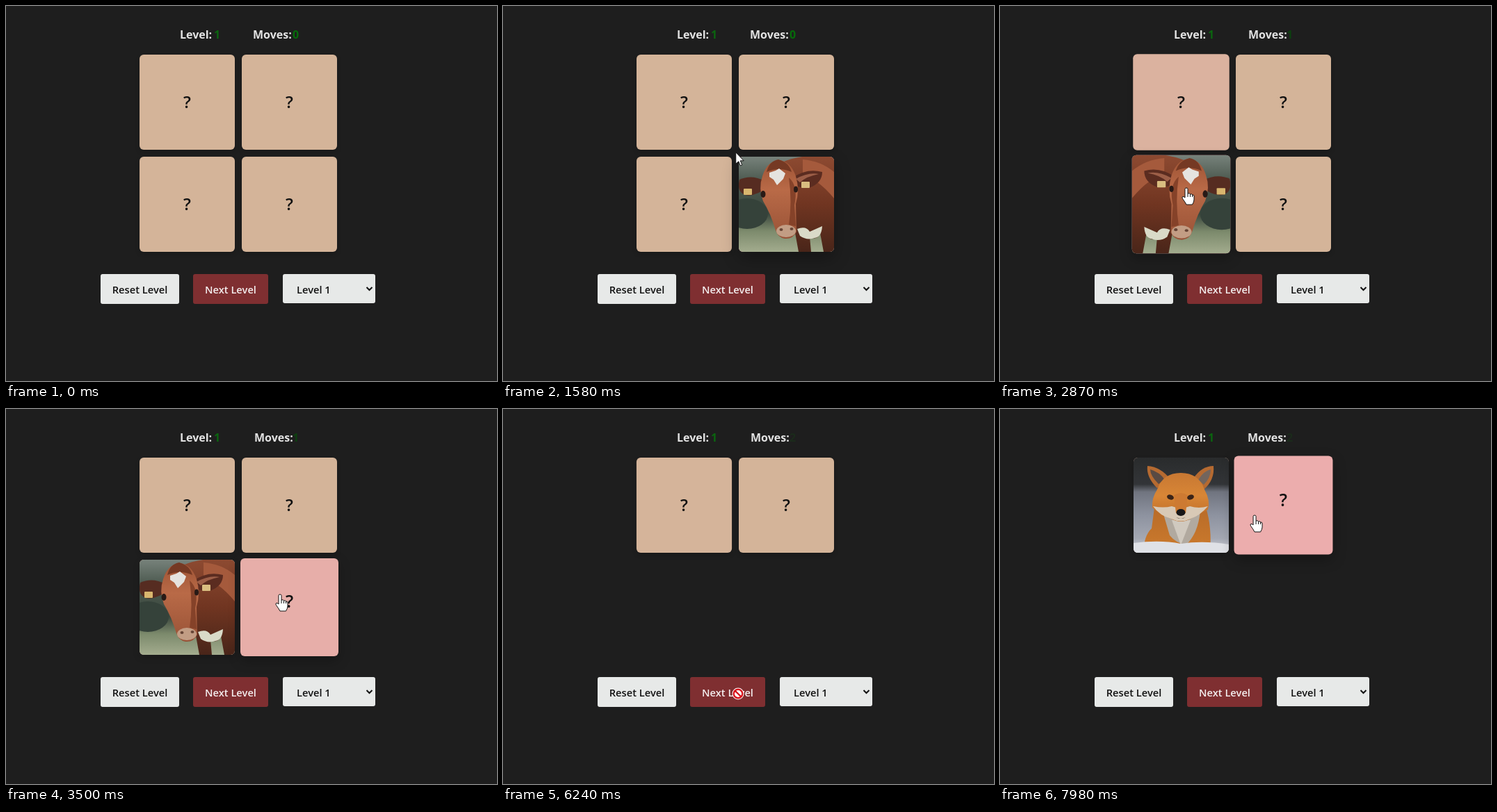
Write an HTML page with a canvas that moves like this. It is 706 by 540 pixels and loops after 8000 ms.

```html
<!DOCTYPE html>
<html lang="en">
<head>
<meta charset="utf-8">
<title>Memory game</title>
<style>
html, body { margin: 0; width: 100%; height: 100%; overflow: hidden; background: #1e1e1e; }
canvas { display: block; }
</style>
</head>
<body>
<canvas id="stage" width="706" height="540"></canvas>
<script>
const ctx = document.getElementById('stage').getContext('2d');
const LOOP = 8000, SIZE = 137, TURN = 500;
const TAN = [212, 180, 153], PINK = [245, 170, 181];
const UI = '"Open Sans", "Noto Sans", sans-serif';

const cards = [
  { x: 192, y: 70, art: drawFox, flips: [[1850, 2355], [7180, 9000]] },
  { x: 339, y: 70, art: drawFox, flips: [] },
  { x: 192, y: 217, art: drawCow, flips: [[2850, 9000]], fade: 4290 },
  { x: 339, y: 217, art: drawCow, flips: [[1000, 2355], [3720, 9000]], fade: 4290 }
];
// card, pointer enters, pointer leaves
const hovers = [
  [3, 560, 1520], [0, 1640, 1950], [0, 2043, 2620], [2, 2660, 3230],
  [3, 3308, 4290], [0, 4500, 5840], [0, 7055, 7700], [1, 7750, 9000]
];
// time, x, y of the pointer
const path = [
  [0, 664, 562], [190, 664, 562], [350, 620, 500], [480, 540, 440], [600, 440, 355],
  [760, 402, 292], [1350, 400, 290], [1580, 335, 211], [1660, 315, 203], [1760, 296, 199],
  [2500, 296, 199], [2600, 287, 208], [2700, 276, 240], [2820, 268, 262], [3200, 268, 262],
  [3308, 339, 266], [3500, 394, 267], [3660, 374, 261], [4300, 374, 261], [4500, 300, 203],
  [4700, 268, 165], [5740, 268, 165], [5850, 290, 212], [6000, 328, 330], [6180, 338, 410],
  [6610, 338, 410], [6710, 338, 407], [6890, 338, 407], [7000, 322, 290], [7060, 302, 205],
  [7180, 285, 165], [7640, 285, 165], [7750, 339, 156], [7980, 366, 153], [8000, 367, 153]
];

const clamp = v => Math.min(1, Math.max(0, v));
const lerp = (a, b, k) => a + (b - a) * k;

function bezier(x1, y1, x2, y2) {
  const at = (a, b, s) => 3 * a * s * (1 - s) ** 2 + 3 * b * s * s * (1 - s) + s ** 3;
  return x => {
    x = clamp(x);
    let lo = 0, hi = 1;
    for (let i = 0; i < 20; i++) {
      const mid = (lo + hi) / 2;
      if (at(x1, x2, mid) < x) lo = mid; else hi = mid;
    }
    return at(y1, y2, (lo + hi) / 2);
  };
}
const ease = bezier(.4, 0, .2, 1);
const fall = bezier(.8, 0, 1, 1);
const rise = bezier(0, 0, .2, 1);

// Monotone cubic interpolation of one pointer coordinate
function along(t, axis) {
  const slope = i => path[i] && path[i + 1]
    ? (path[i + 1][axis] - path[i][axis]) / (path[i + 1][0] - path[i][0]) : 0;
  const tangent = i => {
    const a = slope(i - 1), b = slope(i);
    return a * b > 0 ? 2 * a * b / (a + b) : 0;
  };
  let i = 0;
  while (i < path.length - 2 && path[i + 1][0] <= t) i++;
  const [p, q] = [path[i], path[i + 1]], span = q[0] - p[0], k = (t - p[0]) / span;
  return p[axis] + (q[axis] - p[axis]) * k * k * (3 - 2 * k)
    + span * k * (1 - k) * (tangent(i) * (1 - k) - tangent(i + 1) * k);
}

function transition(t, on, off) {
  if (t < on) return 0;
  return t < off ? ease((t - on) / TURN) : ease((off - on) / TURN) * (1 - ease((t - off) / TURN));
}

function bounce(elapsed) {
  const p = elapsed % 1000 / 500;
  return -8 * (p < 1 ? 1 - fall(p) : rise(p - 1));
}

function box(x, y, w, h, r, color) {
  ctx.fillStyle = color;
  ctx.beginPath();
  ctx.roundRect(x, y, w, h, r);
  ctx.fill();
}

function text(str, x, y, font, color, align = 'left') {
  ctx.font = font;
  ctx.fillStyle = color;
  ctx.textAlign = align;
  ctx.fillText(str, x, y);
}

function shape(d, fill) {
  ctx.fillStyle = fill;
  ctx.fill(new Path2D(d));
}

function oval(x, y, rx, ry, fill, turn = 0) {
  ctx.fillStyle = fill;
  ctx.beginPath();
  ctx.ellipse(x, y, rx, ry, turn, 0, 7);
  ctx.fill();
}

function gradient(...stops) {
  const g = ctx.createLinearGradient(0, 0, 0, SIZE);
  for (const [at, color] of stops) g.addColorStop(at, color);
  return g;
}

function drawCow() {
  shape('M0 0H137V137H0Z', gradient([0, '#77827b'], [.25, '#4d5a50'], [.6, '#3b473d'], [.78, '#7c8a6c'], [1, '#a3ac8e']));
  oval(12, 82, 30, 22, '#35423a');
  shape('M62 8Q90 -4 137 -2V137H122L117 110Q112 122 102 115L104 137H86L80 104Z', gradient([0, '#8d4a31'], [.5, '#703521'], [1, '#492519']));
  shape('M92 4Q118 6 137 22V60Q112 30 92 28Z', '#a55a3c');
  shape('M84 104Q97 99 102 108L120 100Q119 116 109 117Q98 121 88 114Z', '#d9dac8');
  shape('M38 35Q18 25 1 33Q-4 54 14 56Q30 54 38 45Z', '#562c21');
  shape('M78 30Q98 16 120 22Q120 38 101 45Q86 45 78 40Z', '#5b2c20');
  shape('M82 32Q100 22 115 25Q98 28 88 37Z', '#9c5e47');
  shape('M34 28Q40 8 56 5Q74 5 82 28Q88 48 82 68L83 108Q78 119 66 118Q56 116 53 106Q46 82 35 64Q28 45 34 28Z', gradient([0, '#9a5032'], [.35, '#b96a47'], [.7, '#a35a3c'], [1, '#8d4b32']));
  shape('M72 30Q86 42 80 70L82 100L72 98Q77 65 72 30Z', '#854229');
  shape('M40 22Q44 6 57 4Q72 8 76 22Q58 14 40 22Z', '#753923');
  shape('M44 23L53 20L58 17L67 24L64 32L55 41L50 33L44 29Z', '#e5e3df');
  oval(35, 54, 3.5, 5, '#281a16');
  oval(82, 47, 3, 4.5, '#281a16');
  oval(68, 107, 14, 9, '#c29d84');
  oval(61, 105, 2.5, 2, '#674536');
  oval(76, 104, 2.5, 2, '#674536');
  box(7, 46, 12, 9, 1, '#d9b66e');
  box(90, 36, 12, 9, 1, '#d9bd80');
}

function drawFox() {
  shape('M0 0H137V137H0Z', gradient([0, '#292b2c'], [.28, '#333538'], [.36, '#70747f'], [.6, '#8d929f'], [.85, '#a4a8b3'], [1, '#d5d7de']));
  shape('M30 72Q68 58 104 72Q113 100 110 137H14Q15 112 26 102Z', gradient([.5, '#b76a28'], [1, '#cc7b2d']));
  shape('M42 78Q68 92 96 76Q93 110 75 126Q60 122 52 112Z', '#b1a99f');
  shape('M55 90L68 126L82 90Z', '#d0c9bf');
  shape('M34 44Q18 28 20 12Q38 13 52 30Z', '#b56a31');
  shape('M86 30Q98 12 115 12Q117 32 101 46Z', '#b56a31');
  shape('M36 38Q24 26 24 17Q38 21 45 32Z', '#594a43');
  shape('M93 32Q101 19 111 17Q111 29 101 39Z', '#72655d');
  shape('M34 46Q42 22 68 22Q94 22 102 46Q111 62 107 75Q93 82 82 88Q68 96 54 88Q38 82 27 72Q26 58 34 46Z', gradient([.15, '#c77732'], [.4, '#d88636'], [.65, '#bd6b27']));
  shape('M28 70Q43 73 55 70L68 74L81 70Q94 74 107 70Q95 84 82 88Q68 95 54 88Q38 84 28 70Z', '#d8c9b6');
  shape('M58 54Q68 48 78 54L75 80H61Z', '#cd7a32');
  oval(53, 57, 5, 3.5, '#3a2418', .3);
  oval(82, 57, 5, 3.5, '#3a2418', -.3);
  oval(68, 79, 6.5, 5, '#171617');
  shape('M61 86Q68 90 75 86L68 88Z', '#3b302b');
  shape('M0 123Q38 118 68 124Q100 119 137 125V137H0Z', '#dfe1e6');
}

function drawCard(card, index, t) {
  const clock = t > 4870 && t < 5740 ? 4870 : t;
  let hover = 0, lift = 0, turn = 0, flipped = false;
  for (const [target, on, off] of hovers) {
    if (target !== index) continue;
    hover = Math.max(hover, transition(t, on, off));
    if (t >= on && t < off) lift = bounce(clock - on);
  }
  for (const [on, off] of card.flips) {
    turn = Math.max(turn, transition(t, on, off));
    flipped ||= t >= on && t < off;
  }
  const alpha = card.fade ? 1 - ease((t - card.fade) / TURN) : 1;
  if (!alpha) return;
  const scale = 1 + .05 * hover * (1 - turn);
  const facing = Math.cos(Math.PI * turn) * (flipped ? -1 : 1);
  const color = TAN.map((c, i) => Math.round(lerp(c, PINK[i], hover)));

  ctx.save();
  ctx.globalAlpha = alpha;
  ctx.translate(card.x + SIZE / 2, card.y + SIZE / 2);
  ctx.scale(scale * facing, scale);
  ctx.translate(-SIZE / 2, -SIZE / 2);
  ctx.shadowColor = `rgba(0,0,0,${lerp(.18, .32, hover)})`;
  ctx.shadowBlur = lerp(6, 24, hover);
  ctx.shadowOffsetY = lerp(3, 9, hover);
  box(0, 0, SIZE, SIZE, 6, `rgb(${color})`);
  ctx.shadowColor = 'transparent';
  if (flipped) {
    ctx.clip();
    card.art();
  } else {
    text('?', SIZE / 2, 76.5 + lift, `600 24px ${UI}`, '#111', 'center');
  }
  ctx.restore();
}

function drawHeader(t) {
  const font = `700 16px ${UI}`;
  const [moves, x, color] = t < 1850 ? [0, 355, '#066b0a'] : t < 3720 ? [1, 357, '#0d400f'] : [2, 356, '#1b2b1b'];
  text('Level:', 250, 47, font, '#e2e2e2');
  text('1', 299, 47, font, '#0b650f');
  text('Moves:', x, 47, font, '#e2e2e2');
  text(moves, 412, 47, font, color);
}

function drawControls() {
  const font = `600 14.7px ${UI}`;
  box(136, 386, 113, 43, 3, '#e7e9e8');
  text('Reset Level', 192.5, 414, font, '#111', 'center');
  box(269, 386, 108, 43, 3, '#7f2f31');
  text('Next Level', 323, 414, font, '#f4eeee', 'center');
  box(398, 386, 133, 42, 3, '#e7e9e8');
  text('Level 1', 418, 414, font, '#111');
  ctx.strokeStyle = '#111';
  ctx.lineWidth = 2;
  ctx.stroke(new Path2D('M518.5 405L522.5 409L526.5 405'));
}

function drawPointer(t) {
  const x = along(t, 1), y = along(t, 2);
  const inside = (bx, by, w, h) => x >= bx && x < bx + w && y >= by && y < by + h;
  const onCard = cards.some(c => inside(c.x, c.y, SIZE, SIZE) && !(t > c.fade));
  ctx.save();
  ctx.translate(x, y);
  if (inside(269, 386, 108, 43)) {
    oval(0, 0, 8.5, 8.5, '#fff');
    ctx.strokeStyle = '#d8141c';
    ctx.lineWidth = 2.4;
    ctx.beginPath();
    ctx.arc(0, 0, 6.3, 0, 7);
    ctx.moveTo(-4.5, -4.5);
    ctx.lineTo(4.5, 4.5);
    ctx.stroke();
  } else {
    const outline = new Path2D(onCard
      ? 'M-2 14V1.5Q-2 0 0 0T2 1.5V8Q4.5 7 5.5 9Q8 8 8.5 10Q11 9.5 11 12V17Q11 20 8.5 24H0Q-2 20 -5.5 15.5Q-7 12 -4 12.5Z'
      : 'M0 0V16.5L4 13L6.5 19L9 18L6.5 12H11.5Z');
    ctx.fillStyle = '#fff';
    ctx.strokeStyle = '#111';
    ctx.lineWidth = 1;
    ctx.fill(outline);
    ctx.stroke(outline);
    if (onCard) ctx.stroke(new Path2D('M2 8V13M5.5 9V13M8.5 10V13'));
  }
  ctx.restore();
}

function render(now) {
  const t = now % LOOP;
  ctx.fillStyle = '#1e1e1e';
  ctx.fillRect(0, 0, 706, 540);
  drawHeader(t);
  cards.forEach((card, i) => drawCard(card, i, t));
  drawControls();
  drawPointer(t);
}

const start = performance.now();
function tick() {
  render(performance.now() - start);
  requestAnimationFrame(tick);
}
tick();
</script>
</body>
</html>
```
